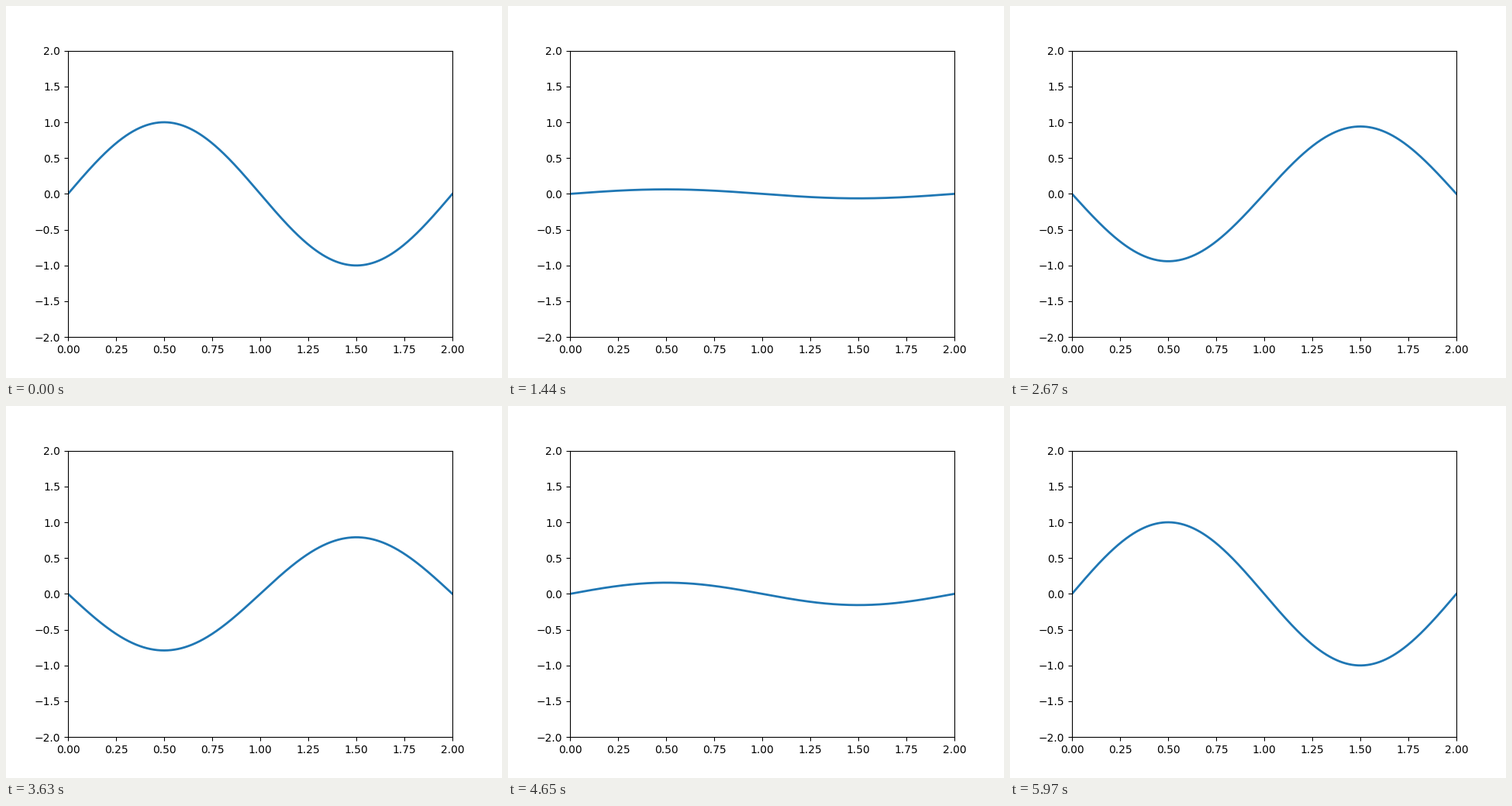
These frames come from a looping animation (640x480 px, 6000 ms). A matplotlib script:

```python
import numpy as np
import matplotlib.pyplot as plt
from matplotlib.animation import FuncAnimation

FRAMES = 200
INTERVAL = 30

fig = plt.figure(figsize=(6.4, 4.8), dpi=100)
ax = fig.add_subplot(xlim=(0, 2), ylim=(-2, 2))
line, = ax.plot([], [], lw=2)

x = np.linspace(0, 2, 1000)


def update(i):
    """Standing wave: one full oscillation per loop."""
    line.set_data(x, np.cos(2 * np.pi * i / FRAMES) * np.sin(np.pi * x))
    return line,


anim = FuncAnimation(fig, update, frames=FRAMES, interval=INTERVAL,
                     repeat=True, repeat_delay=0, blit=True)

plt.show()
```
